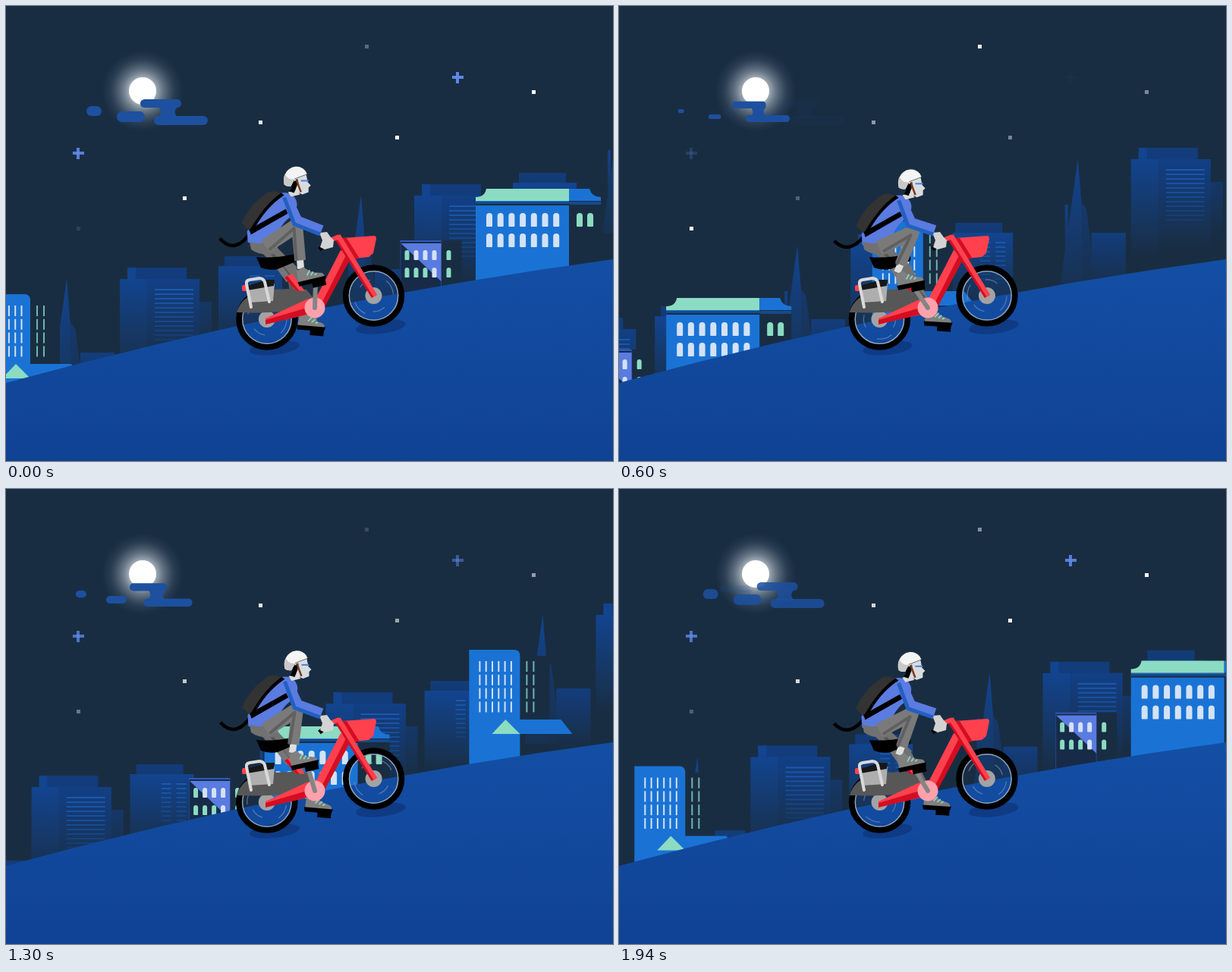
Write an HTML page with a canvas that moves like this. It is 800x600 px and loops after 1960 ms.

```html
<!DOCTYPE html>
<html lang="en">
<head>
<meta charset="utf-8">
<title>Night ride</title>
<style>
html, body { margin: 0; width: 100%; height: 100%; overflow: hidden; background: #192d42; }
canvas { display: block; width: 800px; height: 600px; }
</style>
</head>
<body>
<canvas id="stage" width="800" height="600"></canvas>
<script>
const g = document.getElementById('stage').getContext('2d');
const LOOP = 1960, SCENE = 1000, STEP = 20, TAU = Math.PI * 2;
const SKY = '#192d42', BLUE = '#1a73d4', MINT = '#8bdcc2', PALE = '#d3e2f5', VIOLET = '#5a7be0';
const RED = '#ff414e', DEEP = '#d30d22', WALL = '#12448f', SHADE = '#123c7b', LINE = '#1a59b0';

// ---------- helpers ----------
const clamp = v => Math.min(1, Math.max(0, v));
function times(n, draw) { for (let i = 0; i < n; i++) draw(i); }
function trace(p) {
  g.beginPath();
  for (let i = 0; i < p.length; i += 2) g.lineTo(p[i], p[i + 1]);
}
function poly(color, ...p) { trace(p); g.closePath(); g.fillStyle = color; g.fill(); }
function line(color, w, ...p) { trace(p); g.strokeStyle = color; g.lineWidth = w; g.stroke(); }
function rect(color, x, y, w, h) { g.fillStyle = color; g.fillRect(x, y, w, h); }
function round(color, x, y, w, h, r) {
  g.beginPath(); g.roundRect(x, y, w, h, r); g.fillStyle = color; g.fill();
}
function arch(color, x, y, w, h) { round(color, x, y, w, h, [w / 2, w / 2, 1, 1]); }
function disc(color, x, y, r) { g.beginPath(); g.arc(x, y, r, 0, TAU); g.fillStyle = color; g.fill(); }
function path(color, d) { g.fillStyle = color; g.fill(new Path2D(d)); }
function curve(color, w, d) { g.strokeStyle = color; g.lineWidth = w; g.stroke(new Path2D(d)); }
function fade(y, h, color) {
  const f = g.createLinearGradient(0, y, 0, y + h);
  f.addColorStop(0, color); f.addColorStop(1, SKY);
  return f;
}
function at(x, y, draw) { g.save(); g.translate(x, y); draw(); g.restore(); }
function veil(alpha, draw) { g.save(); g.globalAlpha = alpha; draw(); g.restore(); }

// ---------- sky ----------
function dot() { rect('#fff', -2, -2, 5, 5); }
function plus() {
  rect('#608aea', -7, -2, 15, 4);
  rect('#608aea', -2, -7, 4, 15);
}
// Each star glows brightest at its own phase and never drops below its low
const star = (shape, x, y, peak, low) => ({ shape, x, y, peak, low });
const stars = [
  star(dot, 335, 153, .15, .5), star(dot, 515, 173, 0, .35), star(dot, 695, 113, .98, .35),
  star(dot, 235, 253, .1, .25), star(dot, 95, 293, .6, 0), star(dot, 475, 53, .68, 0),
  star(plus, 595, 94, .05, 0), star(plus, 95, 194, .12, .2)
];

function moon() {
  const glow = g.createRadialGradient(180, 112, 14, 180, 112, 54);
  glow.addColorStop(0, 'rgba(255,255,255,.72)');
  glow.addColorStop(.3, 'rgba(220,228,236,.42)');
  glow.addColorStop(.7, 'rgba(160,175,190,.12)');
  glow.addColorStop(1, 'rgba(120,140,160,0)');
  disc(glow, 180, 112, 54);
  disc('#fff', 180, 112, 18);
}

// Drifts left; shrinks once it is past its starting place (s = 0)
function cloud(s) {
  const color = '#1d509f', k = Math.max(0, s);
  const drift = s < 0 ? 78 : 47;
  const pill = (x, w, shrink, y, h, thin) => {
    const hh = h - thin * k;
    round(color, x - drift * s, y - hh / 2, w - shrink * k, hh, hh / 2);
  };
  pill(106, 20, 20, 138.6, 13, 13);
  pill(146, 37, 34, 146, 14, 13);
  pill(177, 54, 15, 128.5 + 3 * k, 11, 3);
  pill(195, 71, 21, 151 - 4 * k, 12, 5);
  at(205 - drift * s, 0, () => {
    const w = 17 - 6 * k;
    path(color, `M-4 133 Q3 139 -4 147 H${w + 4} Q${w - 3} 139 ${w + 4} 133Z`);
  });
}

function sky(p) {
  rect(SKY, 0, 0, 800, 600);
  moon();
  veil(clamp((1 - p) * 2.5), () => cloud(p));
  veil(clamp((p - .57) / .43), () => cloud(p - 1));
  for (const { shape, x, y, peak, low } of stars) {
    const glow = .5 + .5 * Math.cos(TAU * (p - peak));
    veil(low + (1 - low) * glow, () => at(x, y, shape));
  }
}

// ---------- distant skyline ----------
function slats(x, y, w, n) {
  times(n, i => veil(1 - i / (n + 2), () => rect(LINE, x, y + i * 6, w, 2)));
}
function spire() {
  rect(fade(60, 90, '#12418a'), -17, 60, 4, 70);
  poly(fade(40, 170, '#153a70'), 0, 0, 5, 58, 11, 65, 25, 170, -8, 170);
  poly(fade(0, 210, WALL), 0, 0, -24, 170, 7, 170, 4, 56);
}
function office() {
  rect(fade(-17, 130, SHADE), 8, -13, 62, 20);
  rect(fade(0, 110, WALL), 0, 0, 84, 150);
  slats(41, 12, 13, 9);
  slats(61, 12, 13, 9);
}
function block() {
  rect(fade(30, 75, '#153768'), 105, 30, 16, 140);
  rect(SHADE, 10, -15, 78, 20);
  rect(WALL, 10, -15, 11, 15);
  rect(fade(0, 130, WALL), 0, 0, 105, 180);
  rect(fade(0, 120, '#123f85'), 36, 0, 69, 180);
  slats(46, 13, 51, 12);
}
// The same group three times over, bending down at the middle of the stage
function skyline(p) {
  for (let s = p - 1; s < 2; s++) {
    const dx = s < 0 ? 342 : 388, dy = s < 0 ? 120 : 110;
    at(538 - dx * s, 250 + dy * s, () => {
      at(-70, 0, spire);
      rect(fade(97, 80, '#133d7c'), -52, 97, 45, 90);
      at(130, -17, office);
      block();
    });
  }
}

// ---------- near buildings ----------
function house() {
  rect(SKY, 54, 0, 27, 80);
  rect('#172b49', 0, 0, 54, 110);
  line('#23478f', 1, .5, 110, .5, 1, 54, 1, 54, 110);
  poly(VIOLET, 1, 4, 54, 4, 54, 54);
  rect('#3159b3', 0, 0, 54, 2);
  times(2, r => {
    const y = 13 + r * 23;
    times(4, c => arch(c > r * 2 ? PALE : MINT, 6 + c * 12, y, 6, 13));
    arch(MINT, 61, y, 6, 13);
  });
  path(VIOLET, 'M62 72 Q63 63 70 63 H82 L72 72Z');
}
function hall() {
  rect(SKY, 123, 16, 42, 90);
  rect(BLUE, 0, 16, 123, 190);
  path(MINT, 'M14 0 H123 V16 H0 V11 Q12 11 14 0Z');
  path(BLUE, 'M123 0 H150 Q153 11 165 11 V16 H123Z');
  rect('#174a8c', 0, 17, 165, 4);
  rect(SKY, 0, 20, 124, 2);
  times(7, c => times(2, r => arch(PALE, 14 + c * 14.7, 32 + r * 27, 8, 18)));
  times(2, c => arch(MINT, 133 + c * 14, 32, 8, 18));
}
function tower() {
  rect(SKY, 60, 8, 46, 90);
  round(BLUE, 0, 0, 67, 200, [0, 7, 0, 0]);
  poly(BLUE, 48, 92, 121, 92, 136, 111, 30, 111);
  poly(MINT, 30, 111, 48, 92, 67, 111);
  times(4, r => {
    const y = 15 + r * 17.8;
    times(6, c => rect(PALE, 13 + c * 8.3, y, 2, 14));
    times(2, c => rect('#70b5ac', 75 + c * 9, y, 2, 14));
  });
}
function street(p) {
  for (const s of [p - 1, p, p + 1]) {
    at(519.5 - 928 * s, 309 + 240 * s, house);
    at(619 - 928 * s, 241 + 240 * s, hall);
    at(887 - 922 * s, 140 + 240 * s, tower);
  }
}

// ---------- hill ----------
function shadow(x, y) {
  g.beginPath(); g.ellipse(x, y, 33, 9, -.12, 0, TAU);
  g.fillStyle = '#0f3a84'; g.fill();
}
function hill() {
  const f = g.createLinearGradient(0, 330, 0, 600);
  f.addColorStop(0, '#134fa5'); f.addColorStop(1, '#104294');
  path(f, 'M0 497 Q400 388 800 334 V600 H0Z');
  shadow(354, 451);
  shadow(494, 423);
}

// ---------- bike ----------
const HUB = { x: 407, y: 398 };

function wheel(x, y, spin) {
  const ring = (color, w, r, a = 0, b = TAU) => {
    g.beginPath(); g.arc(x, y, r, a, b);
    g.strokeStyle = color; g.lineWidth = w; g.stroke();
  };
  ring('#000', 8, 36.7);
  ring('#8fa2ba', 1.5, 32.2);
  times(4, i => {
    const a = spin + i * 1.7;
    ring('rgba(125,150,190,.6)', 1.3, i % 2 ? 21 : 26, a, a + .8);
  });
  disc('#a3a3a3', x, y, 11);
}

function pedal(a) { return [HUB.x + 31 * Math.sin(a), HUB.y - 31 * Math.cos(a)]; }

function crank(a) {
  g.lineCap = 'round';
  line('#858585', 6, HUB.x, HUB.y, ...pedal(a));
  g.lineCap = 'butt';
}

function rack() {
  poly('#aeaeae', 318, 372, 354, 366, 352, 389, 321, 391);
  poly('#171717', 318, 369, 344, 361, 354, 361, 353, 369, 318, 375);
  round(RED, 311, 368, 7, 8, 2);
  g.lineCap = 'round';
  curve('#d9d9d9', 4, 'M323 397 L317 367 Q316 362 321 361 L334 359 Q339 359 341 364 L347 390');
  g.lineCap = 'butt';
}

function frame(sway) {
  at(1.5 * sway - 1.5, 0, () =>
    path('#575757', 'M304 404 Q310 383 336 376 Q366 371 396 374 L406 386 L398 399 Q360 406 304 404Z'));
  rack();
  line('#777', 8, 357, 340, 373, 362);
  poly(RED, 367, 358, 377, 353, 394, 376, 382, 375);
  poly(DEEP, 367, 358, 371, 356, 387, 376, 382, 375);
  poly(RED, 342, 412, 396, 387, 420, 381, 416, 403, 342, 419);
  poly(DEEP, 342, 414, 400, 397, 412, 403, 342, 420);
  poly(RED, 408, 386, 441, 322, 456, 329, 420, 395);
  poly(DEEP, 414, 396, 448, 329, 456, 329, 421, 395);
  path(RED, 'M443 306 L485 303 Q488 303 488 307 L484 326 L478 331 L457 333Z');
  poly(DEEP, 441, 306, 449, 306, 466, 333, 457, 334);
  line(RED, 8, 437, 303, 486, 383);
  line(DEEP, 3, 434, 306, 483, 384);
  line(RED, 6, 422, 311, 439, 304);
  line('#000', 6, 413, 321, 423, 313);
  disc('#ffa1ac', HUB.x, HUB.y, 13.5);
  path('#000', 'M330 331 Q355 333 380 327 Q386 328 384 336 L358 347 Q346 349 336 345Z');
}

// ---------- rider ----------
function shoe(a) {
  const [x, y] = pedal(a);
  at(x - 5, y - 3, () => {
    g.rotate(-.07 - .16 * Math.cos(a));
    rect('#000', 0, 1, 18, 7);
    path('#808080', 'M-17 -3 L-16 -19 L-6 -22 Q0 -12 15 -9 Q19 -7 18 -3Z');
    path('#000', 'M-18 -4 H20 L18 2 H-17Z');
    times(3, i => line(MINT, 1.6, -4 + i * 5, -10 + i, 1 + i * 4, -16 + i * 3));
  });
}

// Two bones of equal length from the hip to an ankle above the pedal
function leg(a, hipX, hipY, tone, inner) {
  const BONE = 50, [px, py] = pedal(a);
  const dx = px - 20 - hipX, dy = py - 28 - hipY, d = Math.hypot(dx, dy);
  const bend = Math.sqrt(Math.max(0, BONE * BONE - d * d / 4)) / d;
  const kx = hipX + dx / 2 + dy * bend, ky = hipY + dy / 2 - dx * bend;
  const along = f => [kx + (hipX + dx - kx) * f, ky + (hipY + dy - ky) * f];
  line('#dedede', 9, ...along(.7), ...along(1.15));
  shoe(a);
  g.lineJoin = 'round';
  line(tone, 19, hipX, hipY, kx, ky);
  line(tone, 15, hipX, hipY, kx, ky, ...along(.93));
  const [ex, ey] = along(.93);
  line(inner, 4, hipX + 5, hipY + 5, kx - 4, ky + 4, ex - 5, ey);
}

function head() {
  poly('#dadada', 372, 246, 383, 243, 388, 249, 376, 252);
  path('#d9dcdf', 'M380 229 L396 223 L398 233 L402 237 L399 240 L399 246 L391 249 L382 245Z');
  path('#000', 'M375 235 L385 229 L384 237 L380 247 L374 245 L377 240Z');
  line('#7a3a1e', 2.5, 383, 229, 386, 238, 389, 246);
  line('#4b82dc', 2, 389, 231, 399, 231);
  path('#f4f4f4', 'M367 236 C363 213 386 206 395 218 L397 222 L381 228 L376 238 Q370 239 367 236Z');
  path('#c8c8c8', 'M367 236 Q365 228 368 222 Q372 230 380 229 L376 238 Q370 239 367 236Z');
}

function torso(flap) {
  curve('#000', 4.5, `M324 297 Q303 ${314 + 16 * flap} 282 307`);
  path(VIOLET, 'M360 248 Q372 244 380 252 Q388 262 379 276 Q359 288 355 314 Q336 319 319 312 L318 298 Q330 271 360 248Z');
  path('#333', 'M311 287 Q321 262 346 246 Q354 243 363 248 Q346 260 334 280 L322 298Z');
  path('#000', 'M363 247 Q341 262 321 297 L325 299 Q342 266 367 250Z');
  poly('#000', 321, 295, 371, 267, 372, 274, 323, 302);
}

function arm(dx, dy) {
  const sx = 371 + dx, sy = 256 + dy, ex = 384 + dx * .6, ey = 284 + dy * .6;
  path('#d3d3d3', 'M413 299 L423 298 L428 305 L432 309 L431 318 L420 321 L414 318 L417 309Z');
  g.lineJoin = 'round';
  line(VIOLET, 14, sx, sy, ex, ey, 416, 296);
  line('#2160c2', 5, sx - 4, sy - 3, ex - 4, ey + 4, 414, 301);
}

// Three turns of the crank in two scenes; the body bobs twice a turn
function ride(t) {
  const a = .03 + TAU * 1.5 * t / SCENE, far = a + Math.PI, sway = Math.cos(a);
  const bob = 3.2 - 4 * Math.cos(2 * a - .4);
  const hipX = 342 + bob * .3, hipY = 317 + bob * .5;
  crank(far);
  leg(far, hipX, hipY, '#717171', '#565656');
  wheel(341.2 + 2.7 * sway, 413.5 - .5 * sway, t * .012);
  wheel(487.3 - 2.8 * sway, 381.5 + .5 * sway, t * .012 + 2);
  frame(sway);
  at(bob * .5, bob * .85, () => torso(sway));
  path('#717171', 'M321 311 Q338 316 354 309 L361 326 Q336 331 323 321Z');
  crank(a);
  leg(a, hipX, hipY, '#7a7a7a', '#606060');
  arm(bob * .5, bob);
  at(bob * .5, bob, head);
}

// ---------- timeline ----------
function render(t) {
  const p = t % SCENE / SCENE;
  sky(p);
  skyline(p);
  street(p);
  hill();
  ride(t);
}

const start = performance.now();
function tick() {
  const t = (performance.now() - start) % LOOP;
  render(Math.floor(t / STEP) * STEP);
  requestAnimationFrame(tick);
}
tick();
</script>
</body>
</html>
```
